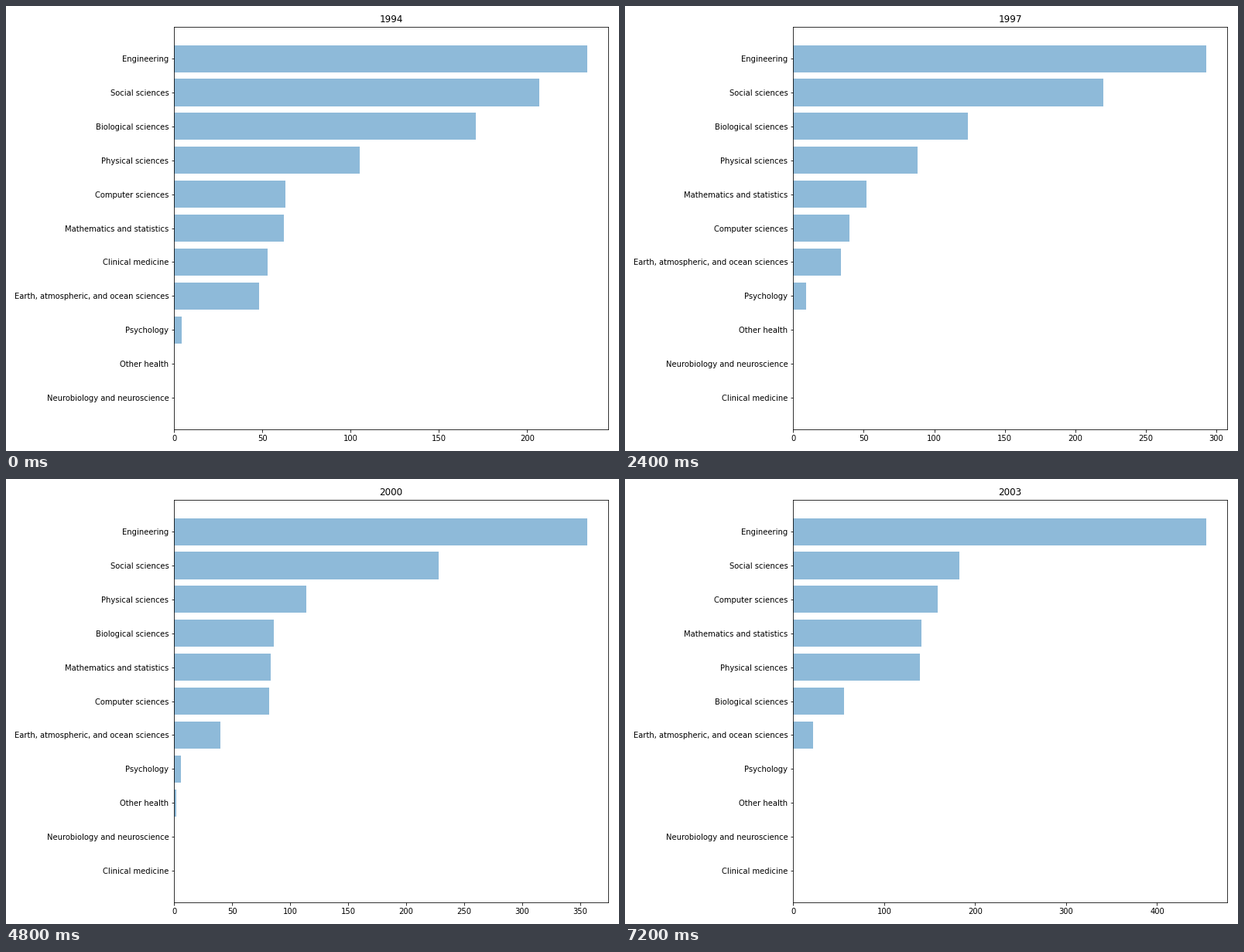
A matplotlib script for the animation above (8 s loop, 792 by 576 pixels).

```python
import numpy as np
import matplotlib.pyplot as plt
from matplotlib.animation import FuncAnimation

W, H, DPI = 792, 576, 72
FIRST_YEAR = 1994
T = np.arange(10)              # years since the first one
KEYS = [0, 1, 2, 3, 5, 7, 9]   # years with a key value


def trend(*values, years=KEYS):
    """Straight lines between key values, sampled once a year."""
    return np.interp(T, years, values)


# Alphabetical, so that the stable sort breaks ties by name
FIELDS = {
    "Biological sciences": trend(171, 171, 135, 124, 107, 64, 56),
    "Clinical medicine": np.where(T < 2, 53 + 2 * T, 0),
    "Computer sciences": trend(63, 41, 75, 40, 75, 89, 159),
    "Earth, atmospheric, and ocean sciences": trend(48, 43, 34, 34, 31, 48, 22),
    "Engineering": trend(234, 154, 204, 293, 307, 304, 356, 374, 390, 454, years=T),
    "Mathematics and statistics": trend(62, 60, 53, 52, 60, 68, 83, 92, 116, 141, years=T),
    "Neurobiology and neuroscience": 0 * T,
    "Other health": np.maximum(0, 5 - 2.5 * abs(T - 7)),
    "Physical sciences": trend(105, 129, 94, 88, 103, 126, 139),
    "Psychology": trend(4, 17, 10, 8, 0, years=[0, 1, 2, 5, 9]),
    "Social sciences": trend(207, 241, 264, 220, 261, 195, 183),
}
NAMES = list(FIELDS)
VALUES = np.round(list(FIELDS.values()))

plt.rcParams["font.family"] = "DejaVu Sans"
fig = plt.figure(figsize=(W / DPI, H / DPI), dpi=DPI, facecolor="white")
ax = fig.add_axes([217.42 / W, 27.8 / H, 560.2 / W, 521.4 / H])


def draw_year(i):
    values = VALUES[:, i]
    order = np.argsort(values, kind="stable")
    rows = np.arange(len(order))

    ax.clear()
    ax.barh(rows, values[order], height=0.8, color="#1f77b4", alpha=0.5)
    ax.set_yticks(rows, [NAMES[k] for k in order])
    ax.set_xlim(0, values.max() * 1.05)
    ax.set_ylim(-0.94, 10.941)
    ax.set_title(str(FIRST_YEAR + i), fontsize=12)
    return []


anim = FuncAnimation(fig, draw_year, frames=len(T), init_func=lambda: draw_year(0),
                     interval=800, repeat=True, repeat_delay=0, blit=False)
plt.show()
```
